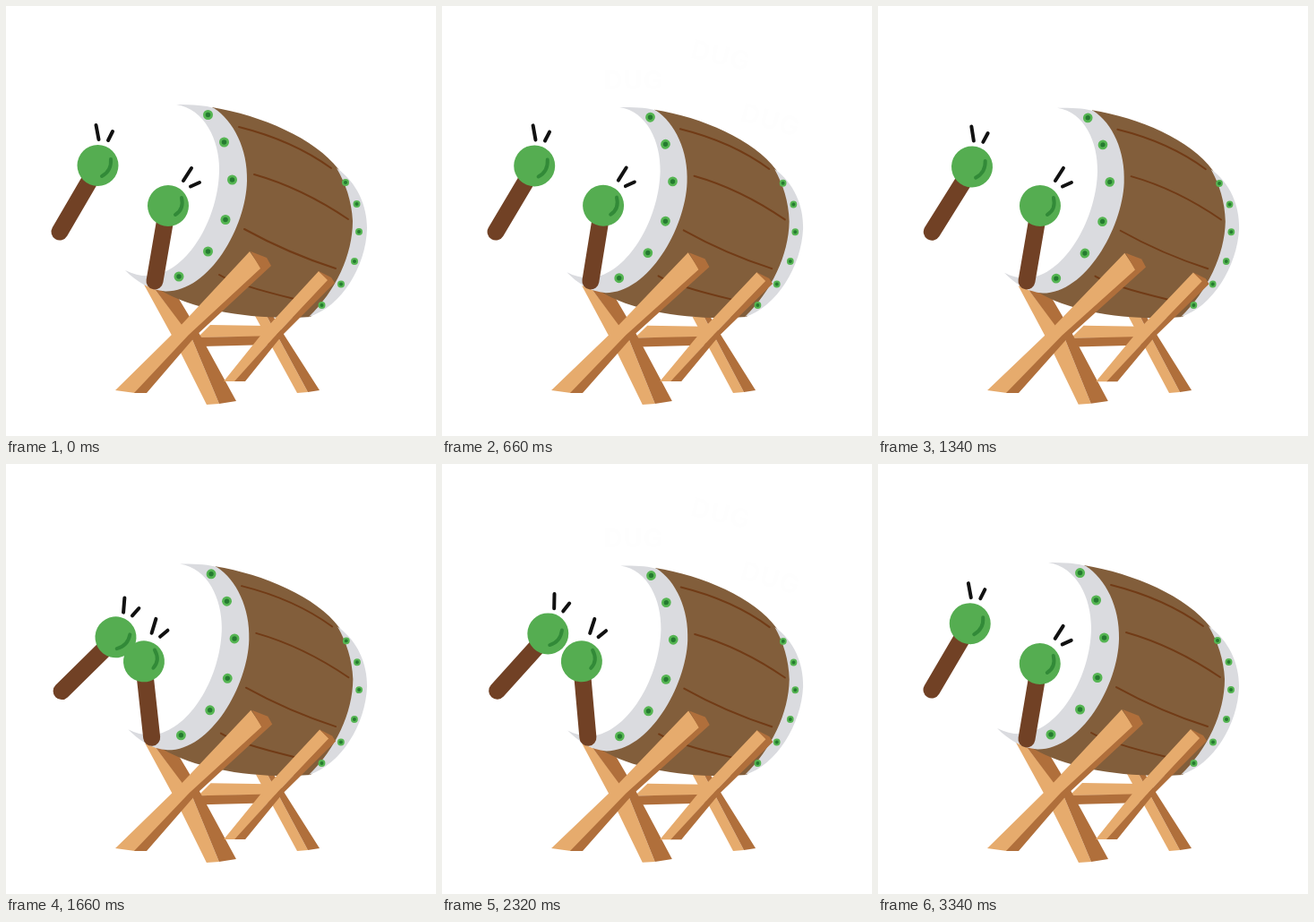
Animation, 480 px wide and 480 px high, one loop 3360 ms. Source, as an HTML page:

```html
<!DOCTYPE html>
<html lang="en">
<head>
<meta charset="utf-8">
<title>Drum</title>
<style>
  html, body { margin: 0; width: 100%; height: 100%; overflow: hidden; background: #fff; }
  svg { display: block; width: 100vw; height: 100vh; }
  .light { fill: #e6ab6d; }
  .dark { fill: #b06f3b; }
  .wood { fill: #825e3b; }
  .rim { fill: #dadbdf; }
  .line { fill: none; stroke-linecap: round; }
  .seam { stroke: #713b16; stroke-width: 2; }
  .stick { stroke: #714125; stroke-width: 19; }
  .head { fill: #55ad51; }
  .shine { stroke: #328a38; stroke-width: 4; }
  .spark { stroke: #111; stroke-width: 4; }
  text { font: 700 29px Inter, sans-serif; fill: #fefefe; text-anchor: middle; letter-spacing: 1px; }
</style>
</head>
<body>
<svg viewBox="0 0 480 480">
  <g class="sound">
    <text x="214" y="93">DUG</text>
    <text transform="translate(309 65) rotate(13)">DUG</text>
    <text transform="translate(364 137) rotate(16)">DUG</text>
  </g>

  <g class="stand">
    <path class="light" d="M228 356L291 357L304 369L214 370Z"/>
    <path class="dark" d="M214 370L304 368L296 378L219 380Z"/>
    <path class="light" d="M278 346L291 346L304 370L337 431L325 432Z"/>
    <path class="dark" d="M291 346L298 346L311 368L350 429L337 431L304 370Z"/>
    <path class="light" d="M154 311L166 316L198 357L207 370L238 444L224 445L188 373Z"/>
    <path class="dark" d="M166 316L187 317L208 352L217 368L257 441L238 444L207 370L197 357Z"/>
  </g>

  <g id="drum">
    <path class="wood" d="M230 113C285 122 345 148 371 182C382 200 388 220 388 240C388 278 368 318 340 347C280 351 212 341 172 317C222 300 250 245 252 195C254 160 245 128 230 113Z"/>
    <path class="rim" d="M369 181C392 197 403 223 403 248C402 291 374 336 338 347C368 318 387 278 387 240C386 218 379 198 369 181Z"/>
    <path class="line seam" d="M260 135Q320 150 363 181M277 188Q330 203 382 238M266 249Q315 276 368 293M238 300Q256 311 322 327"/>
    <path class="rim" d="M190 110C210 110 223 111 232 114C254 128 270 160 269 195C268 247 227 319 178 318.500C160 317 145 307 133 295C147 302 160 303 172 299C210 286 238 230 238 182C238 150 222 115 190 110Z"/>
    <g id="bolts"></g>
  </g>

  <g class="stand">
    <path class="light" d="M349 296L360 306L298 371L256 419L243 419L292 358Z"/>
    <path class="dark" d="M349 296L363 303L367 309L308 368L267 419L255 419L298 371L359 306Z"/>
    <path class="light" d="M272 274L285 293L204 368L144 432L122 429L190 362Z"/>
    <path class="dark" d="M273 274L291 281L296 290L212 368L157 432L143 432L204 367L284 293Z"/>
  </g>

  <g id="left">
    <path class="line stick" d="M95 192L60 252"/>
    <circle class="head" cx="102.500" cy="178" r="23"/>
    <path class="line shine" d="M117 171Q118 184 107 190"/>
    <path class="line spark" d="M100.500 133L103.500 149M119 140L114 150"/>
  </g>
  <g id="right">
    <path class="line stick" d="M177 243L166 307"/>
    <circle class="head" cx="181" cy="223" r="23"/>
    <path class="line shine" d="M196 214Q199 227 189 233"/>
    <path class="line spark" d="M207 181L198 195M216 197L206 201.500"/>
  </g>
</svg>
<script>
const LOOP = 3360;
const $ = id => document.getElementById(id);

function addBolts(points, r) {
  for (const [x, y] of points) {
    $('bolts').innerHTML +=
      `<circle cx="${x}" cy="${y}" r="${r}" fill="#55b552"/>` +
      `<circle cx="${x}" cy="${y}" r="${r * 0.5}" fill="#257a30"/>`;
  }
}
addBolts([[225.5, 121.5], [243.5, 152], [252.5, 194], [245, 238.5], [225.5, 274], [193, 302]], 5.5);
addBolts([[379, 197], [391.5, 221], [394, 252], [389, 285], [374, 310.5], [352.5, 334]], 4);

// Five uneven beats: beat position reached at each time
const times = [0, 660, 1040, 1660, 2320, 2800, LOOP];
const beats = {
  drum: [0, 0.705, 1.14, 2.19, 3.674, 4.44, 5],
  left: [0, 0.945, 1.44, 2.383, 3.305, 4.091, 5],
  right: [0, 0.94, 1.6, 2.45, 3.4, 4.142, 5]
};

function swing(part, t) {
  const b = beats[part];
  const i = times.findIndex(end => end > t);
  const k = (t - times[i - 1]) / (times[i] - times[i - 1]);
  const beat = b[i - 1] + (b[i] - b[i - 1]) * k;
  return (1 - Math.cos(2 * Math.PI * beat)) / 2;
}

const stands = document.querySelectorAll('.stand');
const sounds = document.querySelectorAll('.sound text');
const heard = [[300, 1200], [400, 1090], [500, 950]];

function draw(now) {
  const t = now % LOOP;
  const s = swing('drum', t) * 1.04;
  $('drum').setAttribute('transform',
    `matrix(${1 - 0.04 * s} ${-0.0136 * s} ${-0.0264 * s} ${1 - 0.0107 * s} ${22.8 * s} ${8.4 * s})`);
  // The frame leans from its feet
  for (const stand of stands) {
    stand.setAttribute('transform',
      `matrix(1 0 ${-0.0256 * s} ${1 - 0.0128 * s} ${11.06 * s} ${5.53 * s})`);
  }
  $('left').setAttribute('transform', `rotate(${17.4 * swing('left', t)} 55 260.6)`);
  $('right').setAttribute('transform', `rotate(${-16.35 * swing('right', t)} 158 318)`);
  const u = t % (LOOP / 2);
  sounds.forEach((text, i) => {
    text.style.opacity = u > heard[i][0] && u < heard[i][1] ? 1 : 0;
  });
  requestAnimationFrame(() => draw(performance.now()));
}
draw(performance.now());
</script>
</body>
</html>
```
